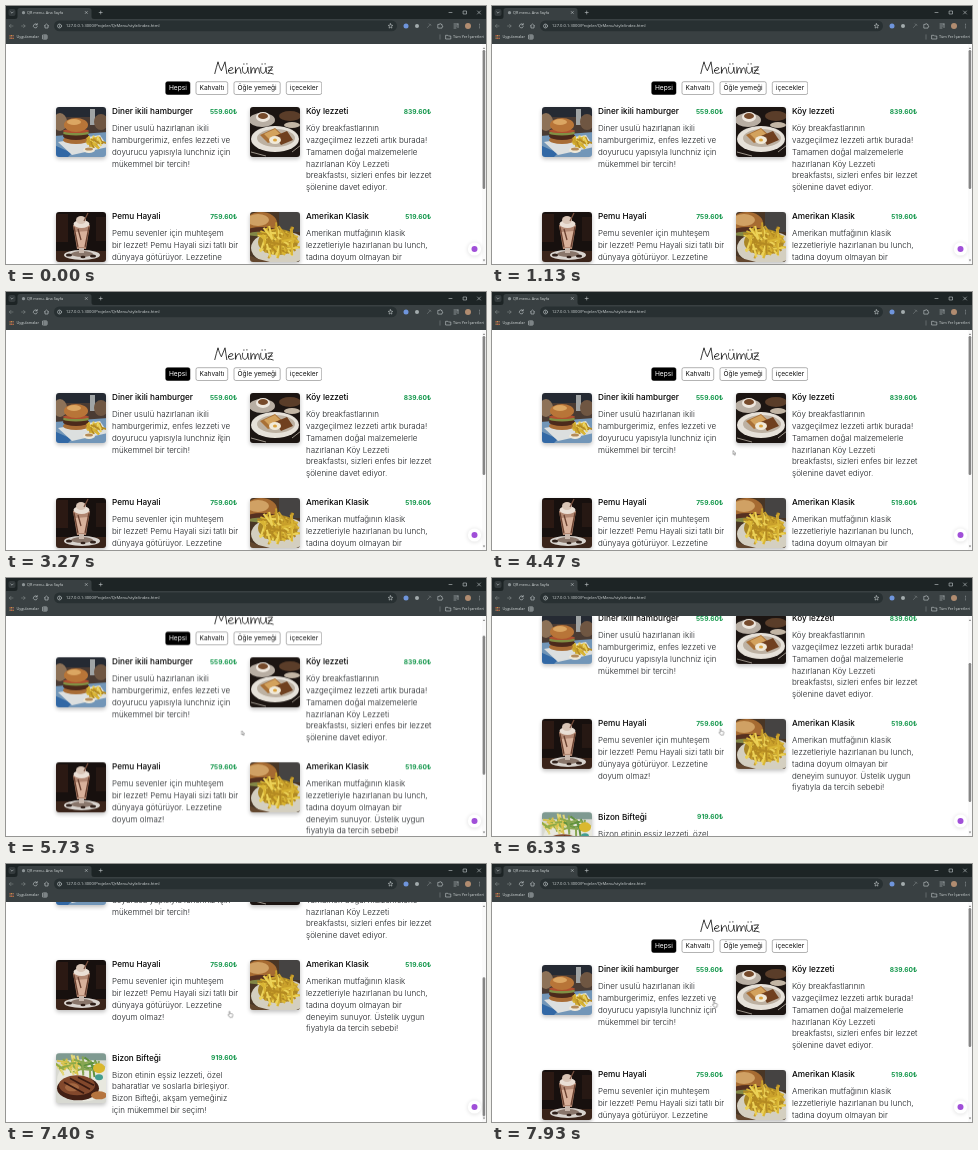
An HTML page that plays this animation: 480x258 px, repeating every 8 s.

```html
<!DOCTYPE html>
<html lang="tr">
<head>
<meta charset="utf-8">
<title>QR menu</title>
<style>
  html, body { margin: 0; width: 100%; height: 100%; overflow: hidden; background: #fff; }
  svg { display: block; width: 100vw; height: 100vh; }
  text { font-family: Inter, "Open Sans", sans-serif; }
  .title { font-size: 8.2px; font-weight: 500; }
  .price { font-size: 6.6px; font-weight: 700; fill: #12964a; text-anchor: end; }
  .body { font-size: 8px; font-weight: 300; fill: #1c1f22; }
  .button { font-size: 6.6px; text-anchor: middle; }
  .ui { font-family: "Open Sans", "Noto Sans", sans-serif; font-size: 3.8px; fill: #d3d8d9; }
  .url { font-size: 4.1px; }
  .line { fill: none; stroke: #c2c8ca; stroke-width: .6; stroke-linecap: round; stroke-linejoin: round; }
  .dim { opacity: .5; }
  .script { fill: none; stroke: #161616; stroke-width: .85; stroke-linecap: round; stroke-linejoin: round; }
</style>
</head>
<body>
<svg viewBox="0 0 480 258" preserveAspectRatio="none">
  <defs>
    <clipPath id="rounded"><rect width="50" height="50" rx="3"/></clipPath>
    <filter id="soft"><feGaussianBlur stdDeviation=".55"/></filter>
    <filter id="shadow" x="-30%" y="-30%" width="160%" height="160%"><feGaussianBlur stdDeviation="2"/></filter>
  </defs>
  <rect width="480" height="258" fill="#fff"/>

  <g id="page">
    <g class="script" role="img" aria-label="Menümüz">
      <path d="M208.8 67.6C209.8 63.6 210.8 59.6 212 55.8C213 59.6 214 62.4 215.4 64.8C216.8 61.6 217.8 58.6 219 55.8C219.6 59.8 220.2 63.8 220.8 67.6"/>
      <path d="M222.4 64.6C224.8 64.8 227.2 63.8 226.8 62.2C225.8 60.6 222.4 62 222.4 65C222.6 67.8 225.6 68 228 66.4"/>
      <path d="M229.4 61.2L229.6 67.4C230 64.2 231.8 61.6 233.2 61.6C234.8 62 234.2 65.2 235 67.4"/>
      <path id="u" d="M236.6 61.2C236 64.4 236.8 67.4 238.8 67.4C240.8 67.4 241.8 64.4 241.8 61.2C241.8 63.4 242 65.8 242.8 67.4M237.9 57.8v.5M240.9 57.6v.5"/>
      <path d="M244.8 61.2L245 67.4C245.4 64.2 246.8 61.6 248 61.6C249.3 62 248.8 64.8 249 67.2C249.5 64.2 250.8 61.6 252 61.6C253.4 62 252.8 65.4 253.6 67.4"/>
      <use href="#u" x="18.2"/>
      <path d="M262 61.2C263.6 61 265.2 60.8 266.6 60.8C265 63.2 263.4 65.2 262 67.4C263.8 67 265.6 67.4 267.2 68M262.6 64.4L266.2 64"/>
    </g>
    <g id="buttons"></g>
    <g id="cards"></g>
  </g>

  <g id="scrollbar">
    <rect x="476" y="38" width="4" height="220" fill="#fafafa"/>
    <path d="M476.8 43L478 41.2L479.2 43ZM476.8 253.6L478 255.4L479.2 253.6Z" fill="#888"/>
    <rect id="thumb" x="476.6" y="44" width="2.6" height="139" rx="1.3" fill="#858585"/>
  </g>

  <circle cx="468.5" cy="243.6" r="6.8" opacity=".12" filter="url(#shadow)"/>
  <circle cx="468.5" cy="243" r="6.6" fill="#fff"/>
  <circle cx="468.5" cy="243" r="3" fill="#a04fd8"/>

  <g id="browser">
    <rect width="480" height="14" fill="#1d2425"/>
    <rect y="13" width="480" height="25" fill="#394042"/>
    <path d="M9 13Q11.5 13 11.5 10.5V4.5Q11.5 2 14 2H83Q85.5 2 85.5 4.5V10.5Q85.5 13 88 13Z" fill="#394042"/>
    <rect x="2.5" y="3" width="7" height="7" rx="2" fill="#343b3d"/>
    <path class="line" d="M4.8 6L6 7.2L7.2 6"/>
    <circle cx="17.5" cy="6.7" r="1.6" fill="#8d9496"/>
    <text class="ui" x="21" y="8">QR menu- Ana Sayfa</text>
    <path class="line" d="M79.3 5.5l2 2m0-2l-2 2M93.2 6.5h3M94.7 5v3M443 6.5h3M457.5 5h3v3h-3zM471.5 5l3 3m0-3l-3 3"/>
    <rect x="48" y="14.5" width="343" height="10.8" rx="5.4" fill="#283032"/>
    <path class="line dim" d="M7 20H3.5M5 18.3L3.3 20L5 21.7M15.5 20H19M17.5 18.3L19.2 20L17.5 21.7"/>
    <path class="line" d="M31 18.7A2 2 0 1 0 31.3 20.6M31.2 17.4v1.5h-1.5M38.3 20L40.5 18L42.7 20M39 19.7V22H42V19.7"/>
    <circle class="line" cx="53.5" cy="20" r="2"/>
    <path class="line" d="M53.5 19.9v1M53.5 18.9v.1"/>
    <text class="ui url" x="60" y="21.4">127.0.0.1:3000/Projeler/QrMenu/style/index.html</text>
    <path class="line" d="M384.5 17.7l.7 1.5 1.6.2-1.2 1.1.3 1.6-1.4-.8-1.4.8.3-1.6-1.2-1.1 1.6-.2z"/>
    <circle cx="400" cy="20" r="2.5" fill="#6f95dc"/>
    <circle cx="411" cy="20" r="2" fill="#a3abad"/>
    <path class="line dim" d="M421.5 21.5L424.5 18.2M423.2 17.8l1.7 1.7"/>
    <path class="line" d="M432.2 18.4h1.2a.8.8 0 0 1 1.6 0h1v1.300a.7.7 0 0 1 0 1.400v1h-3.800z"/>
    <path class="line" d="M448 18h4M448 20h2.5M448 22h2M452 18v3.5"/>
    <circle cx="462" cy="20" r="3" fill="#b18c70"/>
    <path class="line" d="M473.5 18.2v.1M473.5 20v.1M473.5 21.8v.1"/>
    <g id="apps"></g>
    <text class="ui" x="10.5" y="32.4">Uygulamalar</text>
    <path class="line" d="M37 29h4v4h-4zM37 31h4M39 29v4"/>
    <path class="line dim" d="M434 28.8v4.4"/>
    <path class="line" d="M440 29.3h1.8l.7.7h2.3v3h-4.8z"/>
    <text class="ui" x="447" y="32.4">Tüm Yer İşaretleri</text>
  </g>

  <g id="pointer" stroke="#333" stroke-width=".4" fill="#fff">
    <path id="beam" d="M-.8-2.2H.8M0-2.2V2.2M-.8 2.2H.8" fill="none"/>
    <path id="arrow" d="M0 0V4L1 3.200L1.700 4.700L2.300 4.400L1.600 3H2.900Z"/>
    <path id="hand" d="M.3.4Q.8-.3 1.2.4V2.3L3.7 2.8Q4.300 3 4.100 3.800L3.600 6.200H1L-.8 3.900Q-.6 3.100.3 3.700Z"/>
  </g>
</svg>

<script>
const byId = id => document.getElementById(id);
const fillGroup = (id, parts) => byId(id).innerHTML = parts.join('');
const label = (kind, x, y, words, extra = '') => `<text class="${kind}" x="${x}" y="${y}" ${extra}>${words}</text>`;
const oval = (x, y, rx, ry, fill) => `<ellipse cx="${x}" cy="${y}" rx="${rx}" ry="${ry}" fill="${fill}"/>`;
const box = (x, y, w, h, fill) => `<rect x="${x}" y="${y}" width="${w}" height="${h}" fill="${fill}"/>`;
const shape = (d, fill) => `<path d="${d}" fill="${fill}"/>`;
const stroke = (d, color, width) => `<path d="${d}" fill="none" stroke="${color}" stroke-width="${width}"/>`;
const backdrop = fill => box(-2, -2, 54, 54, fill);

let seed = 7;
const random = () => (seed = seed * 16807 % 2147483647) / 2147483647;

// Loose sticks inside an ellipse, used for fries and greens.
const pile = (count, x, y, rx, ry, colors, length) => Array.from({ length: count }, (_, i) => {
  const turn = random() * 2 * Math.PI, far = Math.sqrt(random()), lean = random() * 2.4 - .4;
  const cx = x + rx * far * Math.cos(turn), cy = y + ry * far * Math.sin(turn);
  const dx = Math.cos(lean) * length / 2, dy = Math.sin(lean) * length / 2;
  return stroke(`M${cx - dx} ${cy - dy}L${cx + dx} ${cy + dy}`, colors[i % colors.length], 2);
}).join('');

const fryColors = ['#b48a22', '#d9b534', '#ecd257', '#c9a02c'];
const pictures = {
  burger: backdrop('#4a3b33') + box(-2, -2, 54, 12, '#252a33') + oval(4, 15, 7, 9, '#8d7258') +
    box(34, 2, 5, 16, '#a0a4a5') + oval(45, 15, 7, 8, '#6f5642') + shape('M-2 29L52 25V52H-2Z', '#7296b8') +
    shape('M-2 38L16 46L10 52H-2Z', '#3268a5') + shape('M2 35L44 28L52 40L16 48Z', '#dcdfdf') +
    oval(20, 33, 13, 4, '#a86c35') + oval(20, 29, 13, 4, '#4c2a1b') + oval(20, 26, 13, 2.5, '#809044') +
    oval(20, 24, 13, 2, '#b05030') + oval(20, 18, 12, 7, '#b87538') + oval(18, 15, 7, 3, '#dba662') +
    pile(24, 39, 35, 8, 4, fryColors, 8) + oval(33, 43, 6, 3, '#eee8d9') + oval(33, 42, 4, 1.6, '#b48b59'),
  breakfast: backdrop('#1c1512') + oval(12, 13, 13, 7, '#b8aea3') + oval(13, 10, 7, 5, '#eee7de') +
    oval(13, 9, 5, 3, '#764a2b') + oval(40, 9, 11, 5, '#5a3d29') + oval(42, 18, 8, 3, '#c3b6a5') +
    oval(25, 32, 24, 13, '#e6e1d9') + oval(26, 31, 19, 9, '#bdb1a2') + shape('M10 28L25 21L34 29L18 36Z', '#a97036') +
    shape('M14 27L25 22L30 27L19 32Z', '#d3a25d') + shape('M25 29L37 24L43 33L31 38Z', '#70401f') +
    oval(25, 33, 6, 4, '#f1ead9') + oval(25, 33, 2, 1.6, '#dba23b') +
    stroke('M1 45L16 49M42 45L51 38', '#9b9389', 1),
  shake: backdrop('#17100e') + box(-2, 2, 14, 28, '#2b1913') + box(40, 5, 12, 24, '#261813') +
    shape('M-2 39H52V52H-2Z', '#3a241a') + oval(26, 43, 18, 5, '#d8d3ce') + oval(26, 42, 11, 3, '#89766b') +
    shape('M17 13H34L30 37H21Z', '#b28772') + shape('M19 20L32 19L29 35H22Z', '#d8b19b') +
    stroke('M18 15L22 35M33 15L29 35M22 17L25 28', '#6b4231', 1.3) + box(23, 36, 5, 5, '#c9b8ad') +
    oval(25.5, 12, 8, 4, '#eadfd5') + oval(25, 8, 5, 4, '#d8c4b5') + stroke('M28 9L32 1', '#7b5140', 1.2) +
    oval(13, 43, 3, 1.6, '#30201a') + oval(37, 44, 3, 1.6, '#30201a') + oval(27, 45, 2.5, 1.3, '#30201a'),
  fries: backdrop('#493625') + box(29, -2, 23, 22, '#454342') + oval(30, 36, 29, 17, '#d4cfc0') +
    oval(11, 11, 16, 11, '#a66b32') + oval(8, 8, 11, 6, '#d0a164') + oval(12, 19, 16, 4, '#563020') +
    oval(13, 22, 15, 2.5, '#828746') + oval(28, 30, 20, 13, '#aa8726') +
    pile(75, 28, 29, 18, 12, fryColors, 14) + shape('M-2 43Q18 52 42 52H-2Z', '#63472e'),
  steak: backdrop('#d8d9d2') + box(-2, -2, 54, 9, '#7f9a91') + oval(28, 27, 27, 21, '#e8e8df') +
    pile(32, 15, 13, 13, 7, ['#d8c14a', '#8faa47', '#e3d77b'], 12) +
    pile(18, 34, 13, 9, 7, ['#5f913f', '#87a652'], 11) +
    oval(43, 15, 6, 5, '#dab82f') + oval(43, 24, 4, 3, '#449d91') + oval(22, 35, 21, 12, '#421f14') +
    oval(21, 32, 18, 10, '#82482c') + oval(16, 34, 7, 4, '#a46842') +
    stroke('M8 29L28 40M14 25L34 36M22 24L38 32', '#391a11', 1.6) + oval(43, 42, 8, 4, '#b5743f')
};

const menu = [
  [50, 101, 'burger', 'Diner ikili hamburger', '559.60₺',
    'Diner usulü hazırlanan ikili|hamburgerimiz, enfes lezzeti ve|doyurucu yapısıyla lunchniz için|mükemmel bir tercih!'],
  [244, 101, 'breakfast', 'Köy lezzeti', '839.60₺',
    'Köy breakfastlarının|vazgeçilmez lezzeti artık burada!|Tamamen doğal malzemelerle|hazırlanan Köy Lezzeti|breakfastsı, sizleri enfes bir lezzet|şölenine davet ediyor.'],
  [50, 206, 'shake', 'Pemu Hayali', '759.60₺',
    'Pemu sevenler için muhteşem|bir lezzet! Pemu Hayali sizi tatlı bir|dünyaya götürüyor. Lezzetine|doyum olmaz!'],
  [244, 206, 'fries', 'Amerikan Klasik', '519.60₺',
    'Amerikan mutfağının klasik|lezzetleriyle hazırlanan bu lunch,|tadına doyum olmayan bir|deneyim sunuyor. Üstelik uygun|fiyatıyla da tercih sebebi!'],
  [50, 299.3, 'steak', 'Bizon Bifteği', '919.60₺',
    'Bizon etinin eşsiz lezzeti, özel|baharatlar ve soslarla birleşiyor.|Bizon Bifteği, akşam yemeğiniz|için mükemmel bir seçim!']
];

fillGroup('cards', menu.map(([x, y, picture, name, price, words]) => `
  <rect x="${x}" y="${y + 2}" width="50" height="50" rx="3" opacity=".25" filter="url(#shadow)"/>
  <g transform="translate(${x} ${y})" clip-path="url(#rounded)"><g filter="url(#soft)">${pictures[picture]}</g></g>` +
  label('title', x + 56, y + 7.4, name) + label('price', x + 181.3, y + 7, price) +
  words.split('|').map((line, i) => label('body', x + 56, y + 24.4 + i * 11.7, line)).join('')));

fillGroup('buttons', [[159.7, 24.3, 'Hepsi'], [190, 31.7, 'Kahvaltı'], [228, 46.2, 'Öğle yemeği'], [280.3, 35.4, 'içecekler']]
  .map(([x, w, words], i) => `<rect x="${x}" y="75.7" width="${w}" height="12.8" rx="1.8"
    fill="${i ? '#fff' : '#000'}" stroke="${i ? '#666' : '#000'}" stroke-width=".5"/>` +
    label('button', x + w / 2, 84.4, words, `fill="${i ? '#111' : '#fff'}"`)));

const appColors = ['#d85a4c', '#d99b47', '#b98a5e'];
fillGroup('apps', Array.from({ length: 9 }, (_, i) =>
  box(3.6 + i % 3 * 1.5, 29 + Math.floor(i / 3) * 1.5, 1, 1, appColors[(i + Math.floor(i / 3)) % 3])));

// Tables hold a time in ms followed by the values at that time.
const LOOP = 8000;
const play = (id, table, style, easing = 'linear') => byId(id).animate(
  table.map(([time, ...values]) => ({ offset: time / LOOP, easing, ...style(...values) })),
  { duration: LOOP, iterations: Infinity });

const scroll = [[0, 0], [5430, 0], [5700, 21], [5760, 22.4], [5900, 25], [6150, 50], [6450, 75], [6730, 94],
  [6950, 110], [7430, 110], [7600, 50], [7790, 0], [LOOP, 0]];
const path = [[0, 174.5, 123], [2700, 174.5, 123], [3600, 236, 154], [4300, 241, 158.5], [5000, 241, 158.5],
  [5730, 235.7, 152.7], [6200, 229, 151], [6730, 223.7, 150.2], [7400, 222.7, 147.2], [7860, 221.3, 137], [LOOP, 221.3, 137]];
const shown = { beam: [0, 2700], arrow: [2700, 6100], hand: [6100, LOOP] };

play('page', scroll, y => ({ transform: `translate(0, ${-y}px)` }));
play('thumb', scroll, y => ({ transform: `translate(0, ${y * 0.63}px)` }));
play('pointer', path, (x, y) => ({ transform: `translate(${x}px, ${y}px)` }));
for (const [id, [from, to]] of Object.entries(shown)) {
  const table = [...new Set([0, from, to, LOOP])].map(time => [time, time >= from && (time < to || to === LOOP) ? 1 : 0]);
  play(id, table, opacity => ({ opacity }), 'step-end');
}
</script>
</body>
</html>
```
